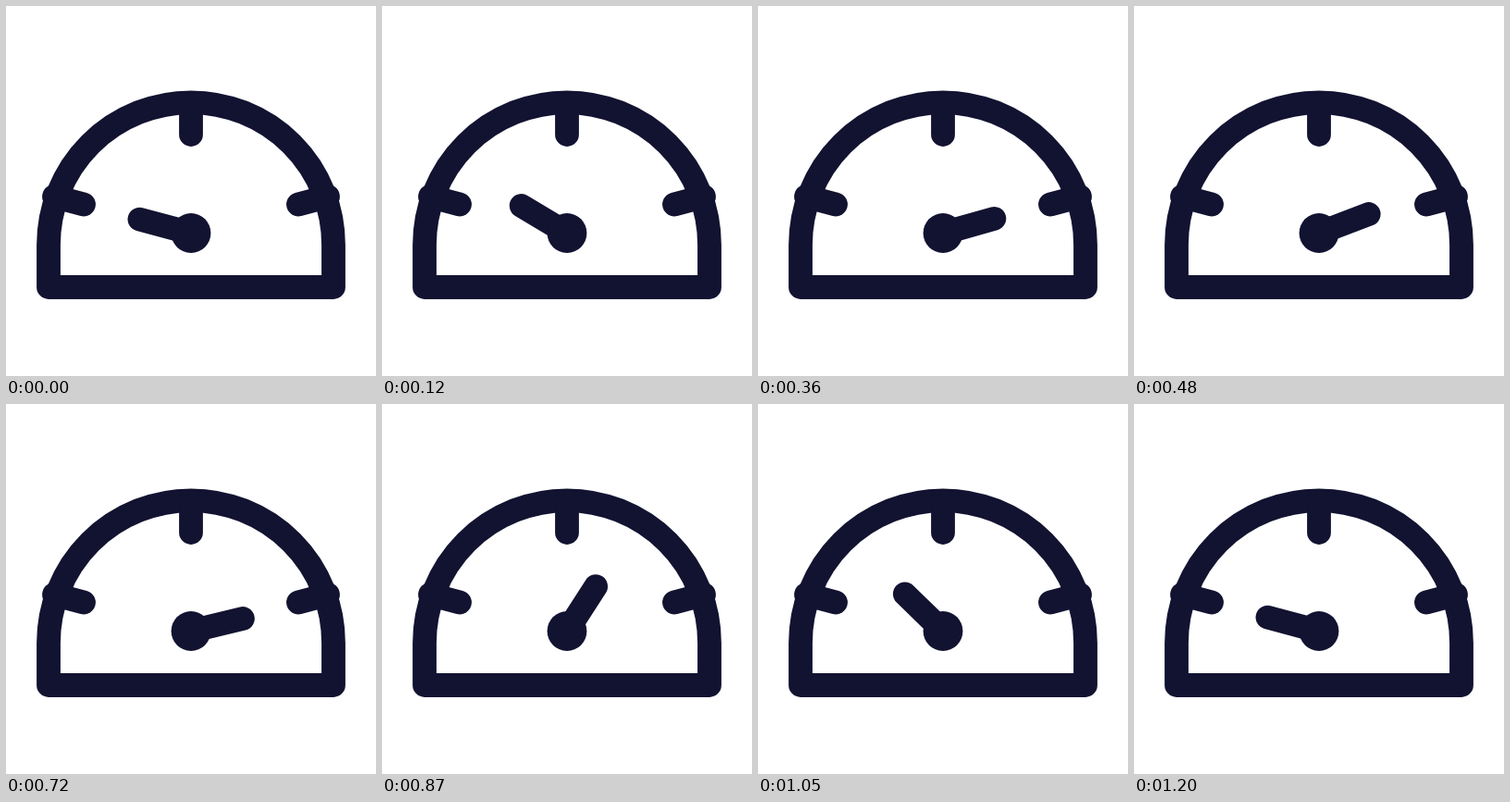
An HTML page with a canvas that plays this animation: 400 by 400 pixels, repeating every 1230 ms.

```html
<!DOCTYPE html>
<html lang="en">
<head>
<meta charset="utf-8">
<title>Gauge</title>
<style>
html, body { margin: 0; width: 100%; height: 100%; overflow: hidden; background: #fff; }
canvas { display: block; width: 400px; height: 400px; }
</style>
</head>
<body>
<canvas id="stage" width="400" height="400"></canvas>
<script>
const ctx = document.getElementById('stage').getContext('2d');
const INK = '#121331';
const LOOP = 1230, STEP = 30;
const HUB = { x: 200, y: 245.5, radius: 21.4 };
const NEEDLE = 57.5;

// [time in ms, needle angle in degrees from vertical]
const KEYS = [[0, -75], [52, -75], [392, 78], [540, 64], [690, 78], [1190, -75], [LOOP, -75]];

const ease = u => u * u * (3 - 2 * u);

function needleAngle(time) {
  const next = KEYS.findIndex(key => key[0] > time);
  const [t0, a0] = KEYS[next - 1];
  const [t1, a1] = KEYS[next];
  return a0 + (a1 - a0) * ease((time - t0) / (t1 - t0));
}

function line(x0, y0, x1, y1) {
  ctx.beginPath();
  ctx.moveTo(x0, y0);
  ctx.lineTo(x1, y1);
  ctx.stroke();
}

function drawDial() {
  ctx.beginPath();
  ctx.moveTo(46, 304);
  ctx.lineTo(46, 258.3);
  ctx.arc(200, 258.3, 154, Math.PI, 0);
  ctx.lineTo(354, 304);
  ctx.closePath();
  ctx.stroke();
  line(200, 105, 200, 139);
  line(52, 206, 84, 214.5);
  line(348, 206, 316, 214.5);
}

function drawNeedle(degrees) {
  const a = degrees * Math.PI / 180;
  line(HUB.x, HUB.y, HUB.x + NEEDLE * Math.sin(a), HUB.y - NEEDLE * Math.cos(a));
  ctx.beginPath();
  ctx.arc(HUB.x, HUB.y, HUB.radius, 0, 2 * Math.PI);
  ctx.fill();
}

function draw(now) {
  const time = Math.floor((now % LOOP) / STEP) * STEP;
  ctx.fillStyle = '#fff';
  ctx.fillRect(0, 0, 400, 400);
  ctx.fillStyle = ctx.strokeStyle = INK;
  ctx.lineWidth = 25.8;
  ctx.lineCap = ctx.lineJoin = 'round';
  drawDial();
  drawNeedle(needleAngle(time));
}

const start = performance.now();
function tick() {
  draw(performance.now() - start);
  requestAnimationFrame(tick);
}
tick();
</script>
</body>
</html>
```
